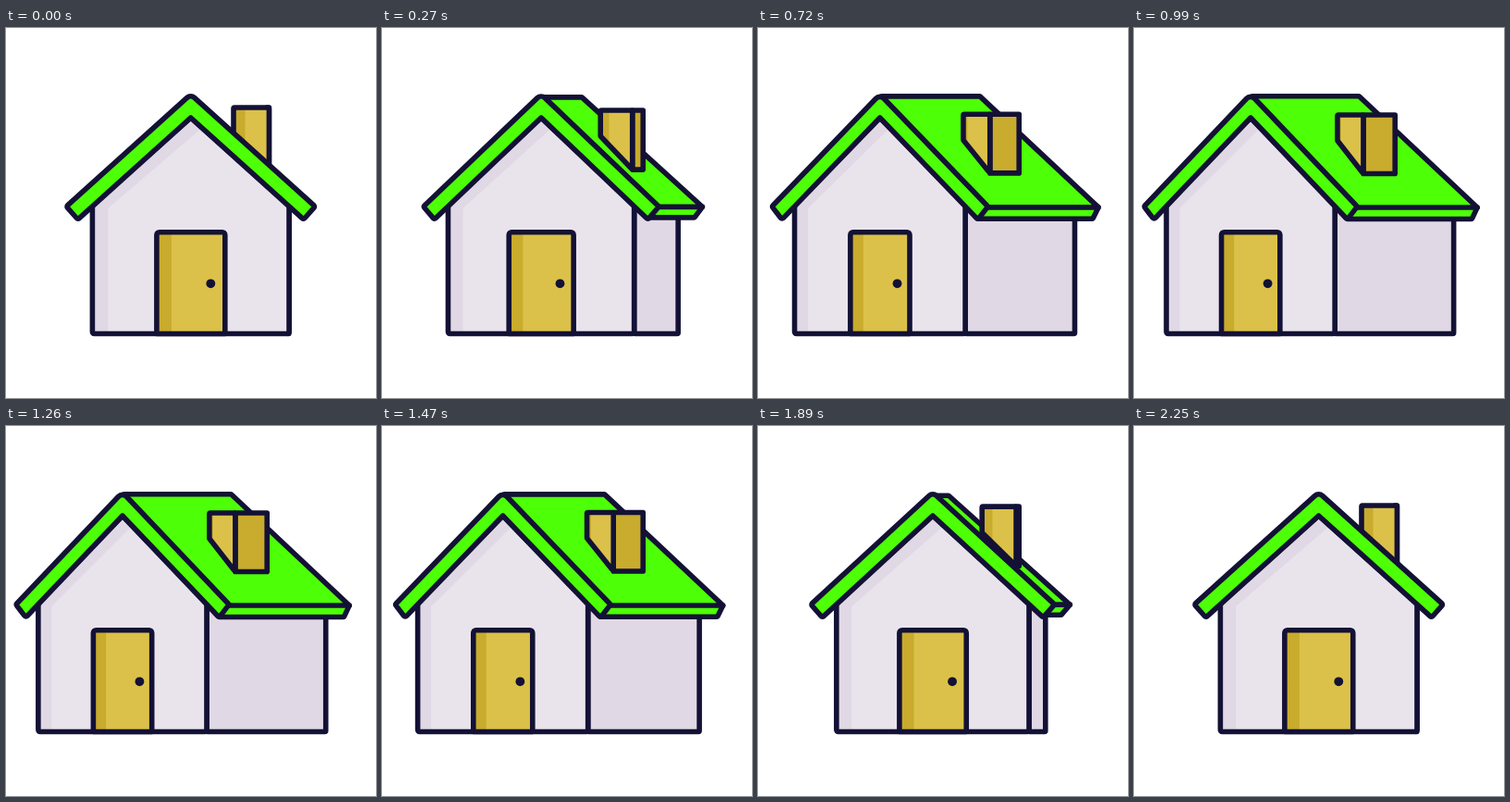
These frames come from a looping animation (400 px wide and 400 px high, 2280 ms). An HTML page with a canvas:

```html
<!DOCTYPE html>
<html>
<head>
<meta charset="utf-8">
<style>
  html, body { margin: 0; width: 100%; height: 100%; overflow: hidden; background: #fff; }
  canvas { display: block; width: 100vmin; height: 100vmin; }
</style>
</head>
<body>
<canvas id="stage"></canvas>
<script>
const LOOP = 2280, HALF = LOOP / 2, STEP = 30;
const INK = '#131135', GREEN = '#4dff07', WALL = '#e9e4ec', SHADE = '#e0d8e4',
      GOLD = '#dbc149', OCHRE = '#c9ab2d';

const canvas = document.getElementById('stage');
const ratio = window.devicePixelRatio || 1;
canvas.width = canvas.height = 400 * ratio;
const ctx = canvas.getContext('2d');
ctx.scale(ratio, ratio);
ctx.lineWidth = 5.6;
ctx.lineJoin = ctx.lineCap = 'round';
ctx.strokeStyle = INK;

// Cubic easing curve from (0,0) to (1,1), solved for x by bisection
function bezier(x1, y1, x2, y2) {
  const at = (a, b, u) => 3 * a * u * (1 - u) ** 2 + 3 * b * u * u * (1 - u) + u ** 3;
  return x => {
    let lo = 0, hi = 1;
    for (let i = 0; i < 24; i++) {
      const mid = (lo + hi) / 2;
      if (at(x1, x2, mid) < x) lo = mid; else hi = mid;
    }
    return at(y1, y2, lo);
  };
}
const turnOut = bezier(.29, .12, .21, 1);
const turnBack = bezier(.78, 0, .28, 1);

// Each point is [x, y] or [x, y, corner radius]
function poly(points, fill, radius = 0) {
  const [ax, ay] = points[0], [bx, by] = points[points.length - 1];
  ctx.beginPath();
  ctx.moveTo((ax + bx) / 2, (ay + by) / 2);
  points.forEach(([x, y, r = radius], i) => {
    const [nx, ny] = points[(i + 1) % points.length];
    ctx.arcTo(x, y, nx, ny, r);
  });
  ctx.closePath();
  if (fill) { ctx.fillStyle = fill; ctx.fill(); }
}

function outlined(points, fill, radius = 1) {
  poly(points, fill, radius);
  ctx.stroke();
}

function line(x1, y1, x2, y2) {
  ctx.beginPath();
  ctx.moveTo(x1, y1);
  ctx.lineTo(x2, y2);
  ctx.stroke();
}

// turn: 0 = seen from the front, 1 = turned furthest
function drawHouse(turn) {
  const center = 199.7 - 74.3 * turn, scale = 1 - .1445 * turn;
  const fx = offset => center + offset * scale;
  const front = points => points.map(([x, y, r]) => [fx(x), y, r]);
  const ground = 330.5;

  ctx.clearRect(0, 0, 400, 400);

  // Walls
  const sideRight = 304.8 + 41.2 * turn;
  outlined([[fx(106.3), 195], [sideRight, 195], [sideRight, ground], [fx(106.3), ground]], SHADE);
  const wall = front([[-106.3, ground], [-106.3, 192], [0, 97, 0], [106.3, 192], [106.3, ground]]);
  poly(wall, SHADE);
  poly(front([[-89.5, ground], [-89.5, 195], [12, 108], [106.3, 192], [106.3, ground]]), WALL);
  outlined(wall, null, 2);

  // Side of the roof
  const ridge = 75.5 - 1.8 * turn, eaveRight = 331.5 + 40 * turn;
  const eaveTop = 193 + turn, eaveLow = 203.9 + 2.6 * turn;
  outlined([[center, ridge], [199.7 + 44 * turn, ridge], [eaveRight, eaveTop],
            [321.5 + 44.2 * turn, eaveLow], [fx(121.5), eaveLow]], GREEN);
  line(fx(133), eaveTop, eaveRight, eaveTop);

  // Chimney
  const left = 246 - 26.3 * turn, edge = 284.4 - 36.8 * turn, right = 282.2;
  const top = 86 + 8 * turn, low = 150.5 + 7 * turn, high = 114 + 7.8 * turn;
  const strip = 12.5 * (1 - .7 * turn);
  const slope = (low - high) / (edge - left);
  const face = [[left, top], [edge, top], [edge, low], [left, high]];
  outlined([[edge, top], [right, top], [right, low], [edge, low]], OCHRE, 0);
  poly(face, GOLD);
  poly([[left, top], [left + strip, top], [left + strip, high + strip * slope], [left, high]], OCHRE);
  outlined(face);

  // Front of the roof
  outlined(front([[-134.5, 193], [0, 71.7, 6], [134.5, 193], [122, 207], [0, 97, 0], [-122, 207]]),
           GREEN, 2);

  // Door
  const door = front([[-36.8, 220.7, 3], [37.1, 220.7, 3], [37.1, ground], [-36.8, ground]]);
  poly(door, GOLD);
  poly(front([[-36.8, 222], [-20.8, 222], [-20.8, ground], [-36.8, ground]]), OCHRE);
  outlined(door, null, 0);
  ctx.beginPath();
  ctx.arc(fx(21.6), 276.3, 4.9, 0, 7);
  ctx.fillStyle = INK;
  ctx.fill();
}

function tick() {
  const time = Math.floor(performance.now() % LOOP / STEP) * STEP;
  drawHouse(time < HALF ? turnOut(time / HALF) : 1 - turnBack((time - HALF) / HALF));
  requestAnimationFrame(tick);
}
tick();
</script>
</body>
</html>
```
